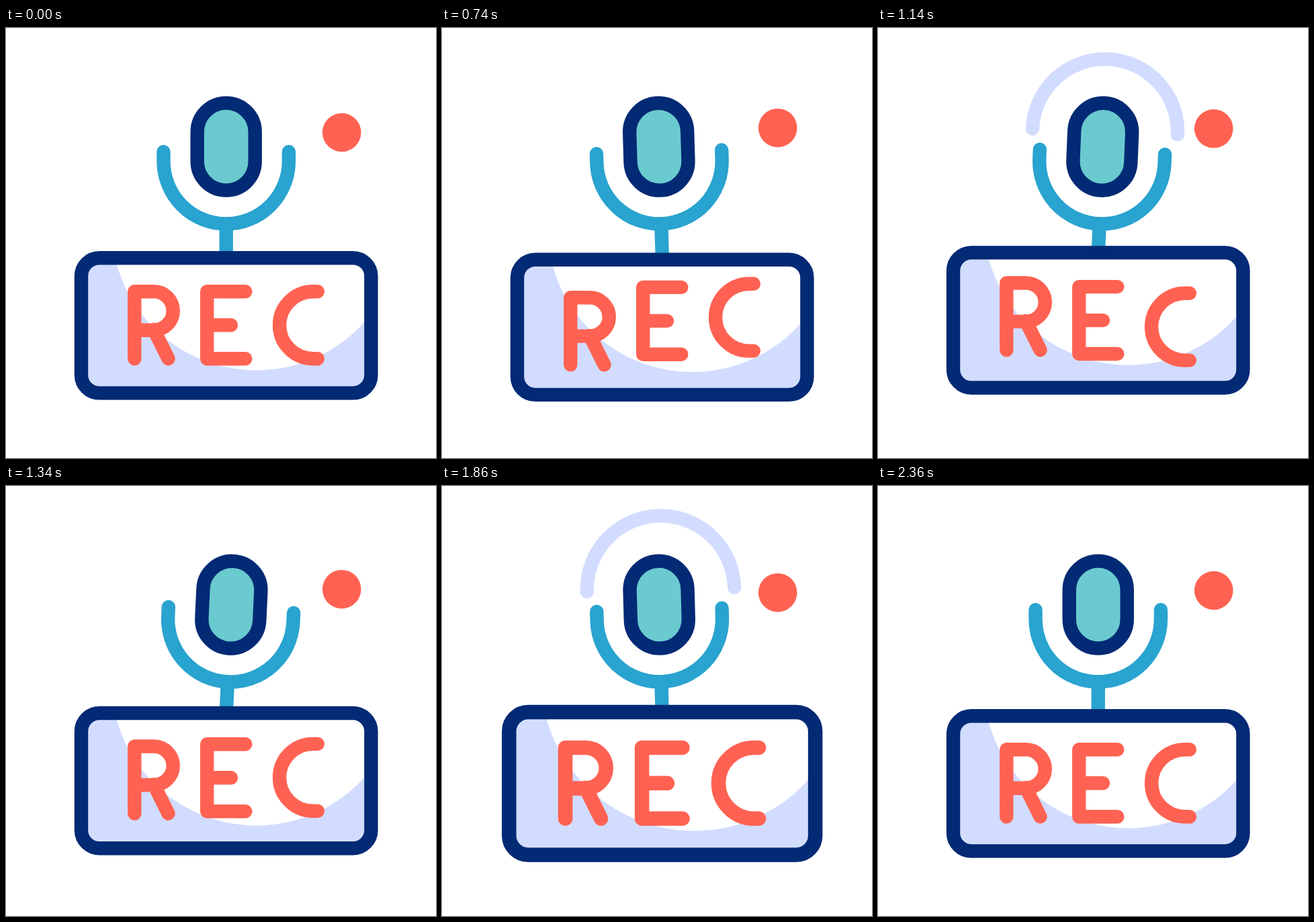
Recreate the animation shown at these times as an HTML page. Size 640 by 640 pixels, loop 2400 ms.

```html
<!DOCTYPE html>
<html lang="en">
<head>
<meta charset="utf-8">
<title>Recording</title>
<style>
  html, body { margin: 0; height: 100%; overflow: hidden; background: #fff; }
  svg { display: block; width: 100%; height: 100%; }
  .line { fill: none; stroke-width: 20.4; stroke-linecap: round; stroke-linejoin: round; }
  .navy { stroke: #022a75; }
  .blue { stroke: #29a3cf; }
  .red { stroke: #ff6252; }
  .pale { stroke: #d2dcfe; }
</style>
</head>
<body>
<svg viewBox="0 0 640 640">
  <clipPath id="inside"><rect x="112" y="342.2" width="431.4" height="201.2" rx="27"/></clipPath>
  <g id="mic">
    <path id="wave" class="line pale"/>
    <path class="line blue" d="M234.5 184.3V198.3A93.2 93.2 0 0 0 420.9 198.3V184.3M327.7 292V346"/>
    <rect class="line navy" x="284.7" y="111.6" width="86" height="130" rx="43" style="fill:#6acacf"/>
  </g>
  <circle id="dot" cx="499.7" cy="155.5" r="28.8" fill="#ff6252"/>
  <g id="sign">
    <g clip-path="url(#inside)">
      <rect x="102" y="332" width="452" height="222" fill="#d2dcfe"/>
      <circle cx="372.7" cy="293.5" r="216" fill="#fff"/>
    </g>
    <rect class="line navy" x="112" y="342.2" width="431.4" height="201.2" rx="27"/>
    <path class="line red letter" d="M191.3 492.2V392.3H220a28.7 28.7 0 0 1 0 57.4H191.3M220 449L241.5 492.2"/>
    <path class="line red letter" d="M356.3 392.3H299.2V492.2H356.3M299.2 442.3H335"/>
    <path class="line red letter" d="M463.8 392.3H457a49.95 49.95 0 0 0 0 99.9H463.8"/>
  </g>
</svg>
<script>
const LOOP = 2400;
const $ = id => document.getElementById(id);
const letters = document.querySelectorAll('.letter');
const clamp = x => Math.max(0, Math.min(1, x));

// Keys are [time, value] pairs joined by smooth in-out easing.
const swing = [[60, 0], [520, -2.8], [1285, 2.8], [1950, -1.8], [2360, 0]];
const dotY = [[60, 0], [920, -7.6], [1740, 3.5], [2360, 0]];
const signY = [[200, 0], [600, 9.5], [940, -9.5], [1680, 0]];
const signScale = [[1700, 1], [2020, 1.112], [2280, 1]];
const letterY = [[140, 0], [530, -14.3], [835, 12.2], [1140, -5], [1400, 0]];

function ease(keys, t) {
  let [lastTime, value] = keys[0];
  for (const [time, next] of keys.slice(1)) {
    if (t <= lastTime) break;
    const p = clamp((t - lastTime) / (time - lastTime));
    value += (next - value) * (1 - Math.cos(Math.PI * p)) / 2;
    lastTime = time;
  }
  return value;
}

function drawWave(t) {
  const age = t < 60 || t >= 2160 ? 460 : (t - 60) % 700;
  const r = 76.8 + 0.082 * age;
  const x = 327.7 + (r - 60) * 0.058;
  $('wave').setAttribute('d', `M${x - r} 154A${r} ${r} 0 0 1 ${x + r} 154`);
  $('wave').setAttribute('opacity', Math.min(clamp(age / 100), clamp((460 - age) / 60)));
}

function frame(now) {
  const t = now % LOOP;
  drawWave(t);
  $('mic').setAttribute('transform', `rotate(${ease(swing, t)} 327.7 338)`);
  $('dot').setAttribute('transform', `translate(0 ${ease(dotY, t)})`);
  $('sign').setAttribute('transform',
    `translate(327.7 ${442.7 + ease(signY, t)}) scale(${ease(signScale, t)}) translate(-327.7 -442.7)`);
  letters.forEach((letter, i) =>
    letter.setAttribute('transform', `translate(0 ${ease(letterY, t - i * 120)})`));
  requestAnimationFrame(frame);
}

const start = performance.now();
const tick = frame;
frame(0);
</script>
</body>
</html>
```
